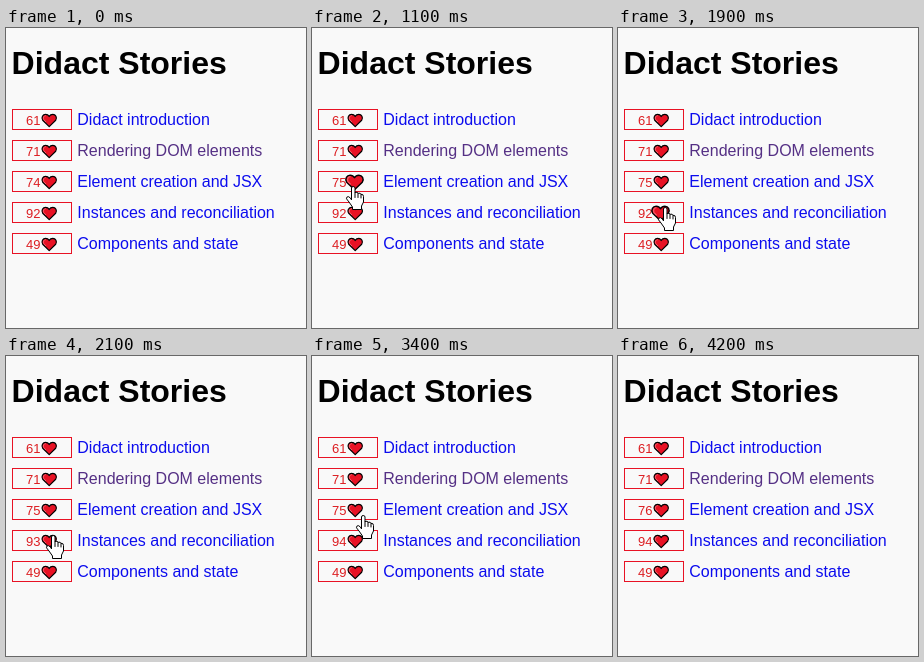
Recreate the animation shown at these times as an HTML page. Size 300 px wide and 300 px high, loop 4500 ms.

```html
<!DOCTYPE html>
<html lang="en">
<head>
<meta charset="utf-8">
<title>Didact Stories</title>
<style>
  html, body { margin: 0; width: 100%; height: 100%; overflow: hidden; background: #f9f9f9; }
  svg { display: block; width: 100vw; height: 100vh; font-family: "Liberation Sans", Arial, sans-serif; }
  .title { font-size: 32px; font-weight: bold; }
  .link { font-size: 16px; fill: #0c0cee; }
  .visited { fill: #553085; }
  .likes { font-size: 13px; fill: #dc1e22; }
  .button { fill: none; stroke: #e81224; }
  .cursor { fill: #fff; stroke: #000; stroke-linejoin: round; stroke-linecap: round; }
</style>
</head>
<body>
<svg viewBox="0 0 300 300">
  <defs>
    <g id="heart">
      <path d="M0 6.2L-6.5 -.2C-8.3 -3 -6.3 -6 -3.7 -6C-1.8 -6 -.6 -5 0 -3.9C.6 -5 1.8 -6 3.7 -6C6.3 -6 8.3 -3 6.5 -.2Z"
        fill="#e81224" stroke="#000" stroke-width="1.2" stroke-linejoin="round"/>
      <path d="M-3.2 1.6L-5.4 -.7C-6.5 -2.8 -5.2 -4.8 -3.4 -4.8" fill="none" stroke="#f1606c"/>
    </g>
  </defs>
  <text class="title" x="5.6" y="46">Didact Stories</text>
  <g id="list"></g>
  <g id="hand" class="cursor">
    <path d="M-.5 13.5V2Q-.5 .5 1.2 .5T3 2V6.5Q5.5 5.6 6.2 7.3Q8.5 6.6 9 8.3Q11.5 8 11.5 10.5V16L9.5 20V23.5H.5V21L-3 16L-5.5 12.8Q-5.7 10.6 -3.7 10.6L-2 11.7Z"/>
    <path d="M3 6.5V11.5M6 7.3V11.5M9 8.3V12" fill="none"/>
  </g>
  <path id="arrow" class="cursor" d="M.5 .7V16.5L4.2 13L6.7 18.5L9 17.5L6.6 12.2H11.6Z"/>
</svg>
<script>
const LOOP = 4500, STEP = 100, TOP = 81, PITCH = 31;

const stories = [
  { title: "Didact introduction", likes: 61, width: 132 },
  { title: "Rendering DOM elements", likes: 71, width: 185, visited: true },
  { title: "Element creation and JSX", likes: 74, width: 185 },
  { title: "Instances and reconciliation", likes: 92, width: 197 },
  { title: "Components and state", likes: 49, width: 161 }
];

const clicks = [
  { row: 2, down: 1100, count: 1100, up: 1200 },
  { row: 3, down: 1900, count: 2000, up: 2100 },
  { row: 3, down: 2800, count: 2900, up: 3000 },
  { row: 2, down: 3700, count: 3700, up: 3800 }
];

const linear = p => p;
const easeIn = p => p ** 1.6;
const easeOut = p => 1 - (1 - p) ** 2;

const moves = [
  { start: 200, end: 700, from: [243, 232], to: [50, 159], ease: easeOut },
  { start: 700, end: 900, from: [50, 159], to: [40, 158], ease: linear },
  { start: 1400, end: 1600, from: [40, 158], to: [46, 179], ease: linear },
  { start: 3000, end: 3400, from: [46, 179], to: [50, 159], ease: easeOut },
  { start: 3800, end: 4100, from: [50, 159], to: [286, 204], ease: easeIn }
];

const byId = id => document.getElementById(id);
const place = (node, x, y, scale = 1) =>
  node.setAttribute("transform", `translate(${x} ${y}) scale(${scale})`);

byId("list").innerHTML = stories.map((story, i) => {
  const y = TOP + i * PITCH;
  return `<rect class="button" x="6.5" y="${y + .5}" width="59" height="20"/>
    <text class="likes" x="20" y="${y + 16}"></text>
    <use href="#heart"/>
    <text class="link${story.visited ? " visited" : ""}" x="71.3" y="${y + 16}">${story.title}</text>`;
}).join("");

const counters = [...document.querySelectorAll(".likes")];
const hearts = [...document.querySelectorAll("use")];

function pointerAt(t) {
  if (t < moves[0].start || t > moves[moves.length - 1].end) return null;
  const { start, end, from, to, ease } = moves.filter(m => m.start <= t).pop();
  const p = ease(Math.min(1, (t - start) / (end - start)));
  return from.map((a, i) => Math.round(a + (to[i] - a) * p));
}

function isClickable([x, y]) {
  return stories.some((story, i) => {
    const dy = y - TOP - i * PITCH;
    const onButton = x >= 6 && x < 66 && dy >= 0 && dy < 21;
    const onLink = x >= 71 && x < 71 + story.width && dy >= 1 && dy < 20;
    return onButton || onLink;
  });
}

function render(time) {
  const t = Math.floor(time % LOOP / STEP) * STEP;

  stories.forEach((story, i) => {
    const own = clicks.filter(c => c.row === i);
    const pressed = own.some(c => t >= c.down && t < c.up);
    counters[i].textContent = story.likes + own.filter(c => t >= c.count).length;
    place(hearts[i], pressed ? 42.5 : 43.2, TOP + i * PITCH + 11.4, pressed ? 1.2 : 1);
  });

  const pointer = pointerAt(t);
  const hover = pointer && isClickable(pointer);
  byId("hand").style.display = hover ? "" : "none";
  byId("arrow").style.display = pointer && !hover ? "" : "none";
  if (pointer) place(byId(hover ? "hand" : "arrow"), ...pointer);
}

const began = performance.now();
function tick() {
  render(performance.now() - began);
  requestAnimationFrame(tick);
}
tick();
</script>
</body>
</html>
```
